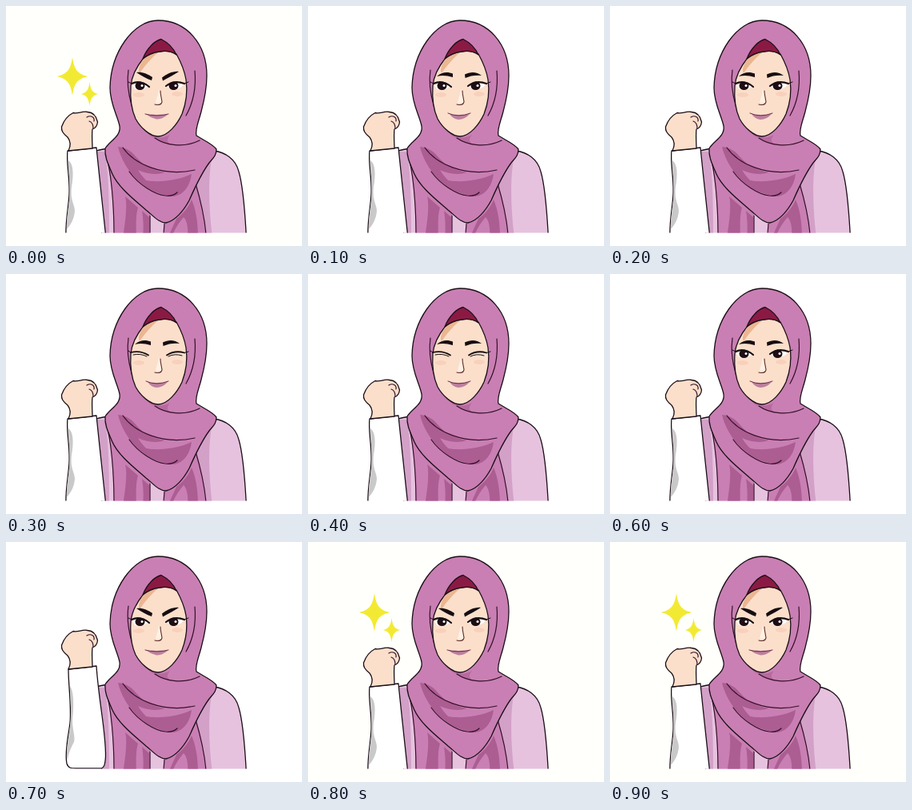
Write an HTML page that moves like this. It is 370 by 300 pixels and loops after 1000 ms.

```html
<!DOCTYPE html>
<html lang="en">
<head>
<meta charset="utf-8">
<title>Cheering woman</title>
<style>
html, body { margin: 0; width: 100%; height: 100%; overflow: hidden; background: #fff; }
svg { display: block; width: 100%; height: 100%; }
.ink { stroke: #1c0f18; stroke-width: 1.3; stroke-linejoin: round; stroke-linecap: round; }
.line { fill: none; stroke: #35102a; stroke-width: 1.2; stroke-linecap: round; }
.scarf { fill: #c97fb3; }
.shade { fill: #ac5d92; }
.shirt { fill: #e6c2de; }
.fold { fill: #d3a0c8; }
.skin { fill: #fbdfca; }
.grey { fill: #c9c9c9; }
.brow { fill: #160d12; }
.lash { fill: none; stroke: #160d12; stroke-linecap: round; }
.lip { fill: #bd7f9f; }
.mouth { fill: none; stroke: #6b2f4c; stroke-width: 1; stroke-linecap: round; }
</style>
</head>
<body>
<svg viewBox="0 0 370 300">
  <defs>
    <clipPath id="floor"><rect width="370" height="283.5"/></clipPath>
    <path id="star" d="M0-1C.12-.34 .34-.14 1 0C.34 .14 .12 .34 0 1C-.12 .34-.34 .14-1 0C-.34-.14-.12-.34 0-1Z"/>
  </defs>
  <rect id="back" width="370" height="300" fill="#fff"/>

  <g clip-path="url(#floor)">
    <!-- shirt -->
    <path class="shirt ink" d="M128 178C121 179 116 180 113 181L120 290H300.500C299 262 297 227 291 207C287 191 274 183 260 181Z"/>
    <path class="fold" d="M114 182H123C128 200 129 240 129 290H122Z"/>
    <path class="fold" d="M236 222L257 191C253 215 253 250 258 290H249Z"/>

    <!-- hanging ends -->
    <path class="scarf" d="M124 184C130 202 134 235 135 290H180V250L198 262V290H250C247 260 242 236 237 222L190 205Z"/>
    <path class="shade" d="M149 238C152 250 149 270 146 290H163C162 270 163 258 165 252Z"/>
    <path class="shade" d="M170 256C172 268 172 278 171 290H179V264Z"/>
    <path class="shade" d="M213 266C221 260 228 252 232 242C238 256 240 272 240 290H227C228 276 226 268 222 264C215 272 209 282 207 290H202Z"/>
    <path class="line" d="M125 187C131 205 135 245 135 285M180 262V285M198 272L197 285M237 222C243 242 248 263 250 285"/>

    <!-- head covering -->
    <path class="scarf ink" d="M190 18C159 18 131 58 130 102C130 122 139 136 142 150C144 163 130 168 124 178C123 190 129 200 133 210C140 226 159 241 175 255C185 263 191 271 200 271C211 269 222 256 229 243C236 227 243 211 254 196C259 190 263 187 263 179C258 172 247 168 238 162C236 154 241 144 244 132C248 117 251 103 251 87C251 48 226 18 190 18Z"/>
    <path class="shade" d="M140 176C151 177 157 182 162 188C172 200 186 206 199 208C186 212 174 209 165 205C174 220 188 230 200 236C172 232 147 205 140 176Z"/>
    <path class="shade" d="M165 215C179 222 212 220 232 210C230 225 222 236 210 238C195 238 178 227 165 215Z"/>
    <path class="shade" d="M176 157C184 166 196 166 205 161C199 168 202 172 210 174C199 173 190 169 186 165C182 164 178 161 176 157Z" opacity=".6"/>
    <path class="line" d="M186 165C199 174 222 178 242 168M146 177C160 197 195 214 236 205M154 207C166 224 187 236 199 237C206 238 211 236 214 233"/>
    <path class="line" d="M236 81C238 104 234 121 225 137M153 80C151 94 153 110 157 124"/>

    <!-- face -->
    <path class="skin ink" d="M172 65C163 76 157 88 156 100C155 115 157 130 162 141C168 152 180 163 190 163C202 163 214 148 220 135C225 122 227 106 225 92C223 80 218 69 213 60C206 56 198 56 192 57C184 58 177 61 172 65Z"/>
    <path d="M172 66Q179 60 190 58C181 66 174 74 167 84C164 80 168 71 172 66Z" fill="#ebb692"/>
    <path class="ink" d="M171 66C176 53 186 43 194 41.500C201 45 209 52 213 61C206 56 198 56 192 57C184 58 177 61 171 66Z" fill="#8a1a44"/>
    <g fill="#f8cdb8" opacity=".8">
      <ellipse cx="166" cy="111" rx="7" ry="3"/>
      <ellipse cx="214" cy="110" rx="7" ry="3"/>
    </g>
    <path d="M191 104C190 111 188 116 187 121L194 121C194 114 193 109 191 104Z" fill="#fff1e4"/>
    <path d="M193 106C193 112 195 117 195 120C194 124 190 124 186 123" fill="none" stroke="#5e2c2c" stroke-width="1.1" stroke-linecap="round"/>

    <g id="open">
      <path d="M158 99Q168 93 178 100Q172 106 161 104Z" fill="#fff"/>
      <path d="M201 100Q210 93 222 98Q218 105 205 104Z" fill="#fff"/>
      <g fill="#1f0d14">
        <ellipse cx="167.500" cy="99.800" rx="6" ry="5.300"/>
        <ellipse cx="209.500" cy="99.800" rx="6" ry="5.300"/>
      </g>
      <g fill="#fff">
        <circle cx="170" cy="99.500" r="1.500"/>
        <circle cx="212" cy="99.500" r="1.500"/>
      </g>
      <path class="lash" stroke-width="2.200" d="M157 97Q168 92 179 101M200 100Q210 92 223 97"/>
      <path class="lash" stroke-width="1" d="M157 97L153 95M223 97L228 95"/>
    </g>
    <g id="closed">
      <path class="lash" stroke-width="1.800" d="M156 98Q168 95 178 101.500M201 101.500Q211 95 223 98.500"/>
      <path class="lash" stroke-width="1" d="M156 98L153 96M223 98.500L228 97M159 101Q168 99 176 103M203 103Q211 99 220 102"/>
    </g>
    <g id="calm">
      <path class="brow" d="M161 88C167 82 175 82 181 84.500L181 89C174 87 168 86 161 88Z"/>
      <path class="brow" d="M196 85.500C203 82 211 82 217 87C210 86 203 87 196.500 90Z"/>
      <path class="lip" d="M177 135Q182 136 188 136Q196 136 202 135Q196 142 188 142Q181 141 177 135Z"/>
      <path class="mouth" d="M175 134Q188 140 203 134"/>
    </g>
    <g id="firm">
      <path class="brow" d="M163 83C170 82 177 85 183 89L182 93C176 91 169 87 163 83Z"/>
      <path class="brow" d="M195 89.500C201 85 209 81 216 82C210 86 202 90 196 93.500Z"/>
      <path class="lip" d="M176 136Q183 135 188 136Q196 135 202 136Q195 141.500 188 141.500Q181 140 176 136Z"/>
      <path class="mouth" d="M174 135Q188 139 203 135"/>
    </g>

    <!-- arm -->
    <g id="low">
      <path d="M77 181C75 195 80 215 79 235C78 254 74 268 75 290H125C121 255 117 215 113 177Z" fill="#fff" class="ink"/>
      <path class="grey" d="M78 193C84 197 85 210 82 226C80 243 86 248 86 256C85 267 81 273 76 279C75 266 79 250 79.500 235C80 216 78 206 78 193Z"/>
    </g>
    <g id="high">
      <path d="M78 159C78 180 82 206 80 226C78 243 73 262 76 277C78 283 82 283 87 283H118C123 283 124 277 124.500 268C125 238 116 200 113 155Z" fill="#fff" class="ink"/>
      <path class="grey" d="M80 180C85 187 85 206 83 222C83 236 87 243 85 250C82 256 78 263 77 273C74 262 79 243 80.500 226C82 206 80 195 80 180Z"/>
    </g>
    <g id="fist">
      <path class="skin ink" d="M78 181C81 175 81 169 77 164C71 159 69 156 69.500 151C72 144 77 137 84 133.500C90 135 95 131 102 132.500C109 133 113 138 114.500 145C114 150 111 153 108 154C107 163 108 170 108 178Z"/>
      <path class="line" d="M101 139C106 136 111 139 110 144M104 144C107 145 109 148 109 153"/>
    </g>
  </g>

  <g id="stars" fill="#f2ea32">
    <use href="#star" transform="translate(83 88) scale(19 24)"/>
    <use href="#star" transform="translate(104.500 110) scale(10.500 15)"/>
  </g>
</svg>
<script>
const LOOP = 1000;
// start time, pose
const steps = [
  [0, "spark"], [100, "smile"], [300, "blink"],
  [600, "smile"], [700, "raise"], [800, "spark"]
];
const parts = {
  spark: ["open", "firm", "low", "stars"],
  smile: ["open", "calm", "low"],
  blink: ["closed", "calm", "low"],
  raise: ["open", "firm", "high"]
};
const get = id => document.getElementById(id);
const ids = [...new Set(Object.values(parts).flat())];
let last = "";

function show(pose) {
  if (pose === last) return;
  last = pose;
  for (const id of ids) {
    get(id).style.display = parts[pose].includes(id) ? "" : "none";
  }
  get("fist").setAttribute("transform", pose === "raise" ? "translate(0 -22)" : "");
  get("back").setAttribute("fill", pose === "spark" ? "#fffffb" : "#fff");
}

function draw(now) {
  const t = now % LOOP;
  show(steps.filter(s => s[0] <= t).pop()[1]);
  requestAnimationFrame(draw);
}
draw(performance.now());
</script>
</body>
</html>
```
